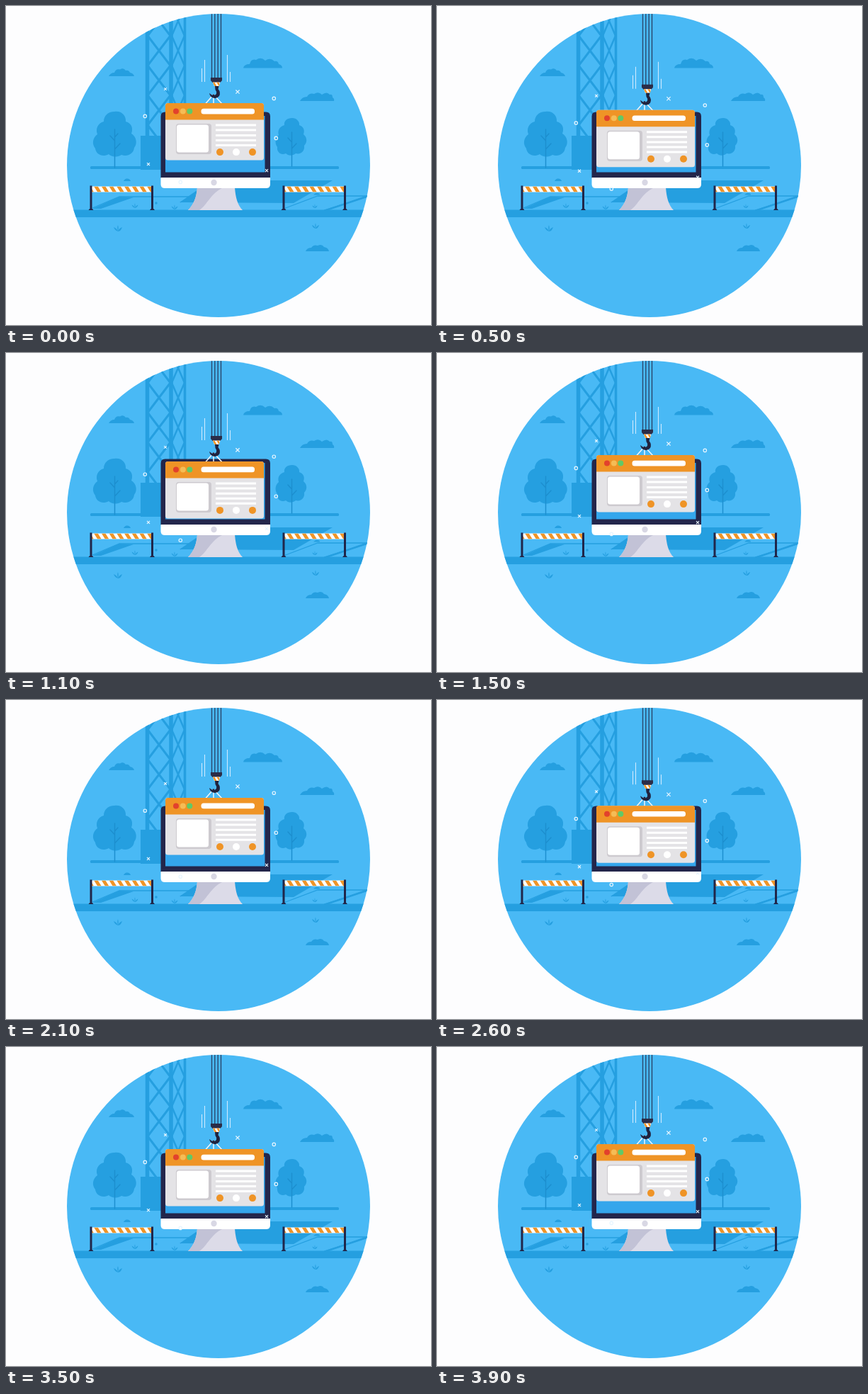
Recreate the animation shown at these times as an HTML page. Size 600 by 450 pixels, loop 4 s.

```html
<!DOCTYPE html>
<html lang="en">
<head>
<meta charset="utf-8">
<title>Under construction</title>
<style>
html, body { margin: 0; width: 100%; height: 100%; overflow: hidden; background: #fdfdfe; }
svg { display: block; width: 600px; height: 450px; }
</style>
</head>
<body>
<svg viewBox="0 0 600 450">
  <defs>
    <clipPath id="disc"><circle cx="300" cy="225" r="214"/></clipPath>
    <clipPath id="bar"><rect x="1" y="1" width="86" height="8"/></clipPath>
    <clipPath id="block"><path d="M292 107.500H302.500L300.500 113H294Z"/></clipPath>
    <clipPath id="front"><rect x="199" y="0" width="34" height="184"/></clipPath>
    <clipPath id="side"><rect x="234" y="0" width="18" height="184"/></clipPath>
    <g id="grass" fill="#259fe0">
      <path d="M0 0C-1 -3 -3 -5 -6 -6C-5 -3 -3 -1 0 0C-1 -4 -1 -7 0 -9C1 -6 1 -3 0 0C1 -3 3 -5 6 -6C5 -3 3 0 0 0"/>
    </g>
    <g id="barrier">
      <rect x="1" y="1" width="86" height="8" fill="#fff"/>
      <g id="stripes" clip-path="url(#bar)" fill="#ef9427"></g>
      <g fill="#20264a">
        <rect x="-1" width="3" height="34"/><rect x="85.500" width="3" height="34"/>
        <path d="M-3 34.500Q-2 32 .5 32T4 34.500ZM83.500 34.500Q84.500 32 87 32T90.500 34.500Z"/>
      </g>
    </g>
  </defs>

  <g clip-path="url(#disc)">
    <rect x="80" y="5" width="440" height="440" fill="#49b9f5"/>

    <g id="tower" fill="none" stroke="#259fe0">
      <path d="M199.500 0V184M233 0V184" stroke-width="5.500"/>
      <path d="M252.500 0V184" stroke-width="3.500"/>
      <path id="frontX" clip-path="url(#front)" stroke-width="3"/>
      <path id="sideX" clip-path="url(#side)" stroke-width="2.500"/>
    </g>
    <rect x="190" y="183" width="70" height="48" fill="#259fe0"/>

    <g fill="#259fe0">
      <rect x="119" y="226" width="351" height="4" rx="1.500"/>
      <!-- clouds and mounds -->
      <path d="M145 99Q148 94 153 94Q155 88 161 89.500Q166 86.500 169 91Q173 90 175 94Q180 95 181 99Z"/>
      <path d="M335 87.500Q336 82 344 82Q346 74 353 76Q360 71 366 77Q373 72 379 78Q384 77 385 82Q390 83 390 87.500Z"/>
      <path d="M415 134Q418 128 425 128Q428 122 435 124Q441 120 446 125Q453 120 457 125Q461 124 461 129Q464 131 463 134Z"/>
      <path d="M423 346Q425 341 431 341Q434 336 440 338Q446 335 449 340Q455 341 456 346Z"/>
      <path d="M166 247Q168 243 171 243.500Q175 243.500 176 247ZM434 266.500Q437 263 440 264Q443 264 443 266.500Z"/>
      <!-- tree crowns -->
      <path d="M153 149C162 147 170 154 169 163C177 165 180 172 177 180C184 184 186 194 181 200C180 209 171 213 163 210C156 214 149 213 145 209C136 214 127 209 126 201C121 195 122 186 129 181C126 173 130 165 138 163C138 155 144 149 153 149Z"/>
      <path d="M404 158C410 158 415 163 414 168C420 170 422 175 420 181C426 186 425 193 421 197C422 205 416 210 409 208C404 212 398 211 395 208C388 211 382 206 383 199C379 193 380 186 385 182C383 176 386 170 393 168C392 162 397 158 404 158Z"/>
    </g>
    <g fill="none" stroke="#1c8fcf" stroke-width="1.500" stroke-linecap="round">
      <path d="M153.500 174V228M153.500 190L147 183M153.500 202L161 194M153.500 185L158 180"/>
      <path d="M403.500 178V226M403.500 192L398 186M403.500 201L410 194"/>
    </g>

    <!-- ground -->
    <path d="M245 277L290 246H461L406 278Z" fill="#259fe0"/>
    <path d="M122 285L160 269H262L246 277M392 286L440 268H512M449 288L512 268" fill="none" stroke="#259fe0" stroke-width="1.300"/>
    <path d="M122 286L160 269L180 270L134 286ZM449 288L510 267V270L456 288Z" fill="#259fe0"/>
    <rect x="80" y="287.500" width="440" height="10.500" fill="#259fe0"/>
    <use href="#grass" transform="translate(182 285) scale(.75)"/>
    <use href="#grass" transform="translate(238 287) scale(.75)"/>
    <use href="#grass" transform="translate(158 318)"/>
    <use href="#grass" transform="translate(437 314) scale(.85)"/>
    <use href="#grass" transform="translate(436 285) scale(.6)"/>
    <circle cx="212" cy="278" r="1.700" fill="#259fe0"/>

    <use href="#barrier" x="119.500" y="253.500"/>
    <use href="#barrier" x="391.500" y="253.500"/>

    <!-- monitor -->
    <path d="M270 256H323C324 270 327 281 334 288H257C265 280 269 270 270 256Z" fill="#dcdbe8"/>
    <path d="M270 256H308C291 261 284 281 273 288H257C265 280 269 270 270 256Z" fill="#c2c2d6"/>
    <path d="M218.500 243V155.500Q218.500 149.500 224.500 149.500H367Q373 149.500 373 155.500V243Z" fill="#23264b"/>
    <path d="M218.500 242H373V251.500Q373 257 367.500 257H224Q218.500 257 218.500 251.500Z" fill="#fff"/>
    <circle cx="293.500" cy="249" r="4.200" fill="#d8d7e4"/>
    <rect x="225" y="155" width="140.500" height="79.500" fill="#34a6ec"/>

    <g id="load">
      <path d="M290.500 -20V102M294.800 -20V102M299.200 -20V102M303.500 -20V102" stroke="#29476b" stroke-width="1.400"/>
      <path d="M276.500 88V107M280.500 76V107M312.500 69V107M316.500 93V107" stroke="#cdeaff" stroke-width="1.100"/>

      <!-- pulley and hook -->
      <path d="M293 125L281.500 138M293 125V138M293 125L305 138" fill="none" stroke="#f2f6fb" stroke-width="1.500"/>
      <path d="M289 101H305V105L302.500 108H291.500L289 105Z" fill="#2b2d48"/>
      <g clip-path="url(#block)">
        <rect x="290" y="107" width="14" height="7" fill="#fff"/>
        <path d="M291 107H294L298 114H295ZM297 107H300L304 114H301Z" fill="#ef9427"/>
      </g>
      <path d="M295 113H300.500L299.500 117Q303.500 122 301 127Q297 132 291 129Q288 127.500 287 123L290.500 125.500Q294 127.500 297 124Q298 121 295.500 118Z" fill="#20233f"/>
      <circle cx="293" cy="126" r="1.600" fill="#20233f"/>

      <!-- browser window -->
      <rect x="225" y="137" width="139" height="80.500" rx="3.500" fill="#e4e3e6"/>
      <path d="M225 160.500V140.500Q225 137 228.500 137H360.500Q364 137 364 140.500V160.500Z" fill="#ef9426"/>
      <circle cx="240" cy="148.500" r="4" fill="#e2412c"/>
      <circle cx="249.800" cy="148.500" r="4" fill="#f5bc55"/>
      <circle cx="259.300" cy="148.500" r="4" fill="#60c968"/>
      <rect x="275.500" y="144.700" width="75.500" height="7.600" rx="3.500" fill="#fff"/>
      <rect x="240" y="166" width="50" height="43" rx="4" fill="#cdcacf"/>
      <rect x="241" y="167.500" width="45" height="39" rx="3.500" fill="#fff"/>
      <path d="M296 168H353M296 175H353M296 182.300H353M296 189.300H353M296 196.300H353" stroke="#fff" stroke-width="3"/>
      <circle cx="302" cy="206" r="5" fill="#ef9426"/>
      <circle cx="325" cy="206" r="5" fill="#fff"/>
      <circle cx="348" cy="206" r="5" fill="#ef9426"/>

      <g id="sparks" fill="none" stroke="#e6f5ff" stroke-width="1.200"></g>
    </g>
  </g>
</svg>
<script>
const el = id => document.getElementById(id);

// Cross bracing between two uprights
function brace(x1, x2, step, start) {
  let d = "";
  for (let y = start; y < 184; y += step)
    d += `M${x1} ${y}L${x2} ${y + step}M${x2} ${y}L${x1} ${y + step}`;
  return d;
}
el("frontX").setAttribute("d", brace(200, 232, 42, 0));
el("sideX").setAttribute("d", brace(234, 252, 42, 0));

let stripes = "";
for (let x = -6; x < 88; x += 10.7)
  stripes += `<path d="M${x} 1h5.500l5 8h-5.500z"/>`;
el("stripes").innerHTML = stripes;

const cross = ([x, y, r]) =>
  `<path d="M${x - r} ${y - r}l${2 * r} ${2 * r}m0 ${-2 * r}l${-2 * r} ${2 * r}"/>`;
const ring = ([x, y]) => `<circle cx="${x}" cy="${y}" r="2.200"/>`;
el("sparks").innerHTML =
  [[327, 121, 2.6], [225, 117, 1.8], [201, 223, 2], [368, 232, 2]].map(cross).join("") +
  [[196.3, 155.3], [378.3, 130.3], [381.3, 186.3], [246.3, 248.3]].map(ring).join("");

const LOOP = 4000, BOB = 2000, STEP = 100, LEAD = 50, SWING = 8.4;
const load = el("load");

function draw(ms) {
  const t = Math.floor((ms % LOOP) / STEP) * STEP;
  const y = SWING * (1 - Math.cos(2 * Math.PI * (t + LEAD) / BOB));
  load.setAttribute("transform", `translate(0 ${y.toFixed(2)})`);
}

const start = performance.now();
function tick() {
  draw(performance.now() - start);
  requestAnimationFrame(tick);
}
tick();
</script>
</body>
</html>
```
